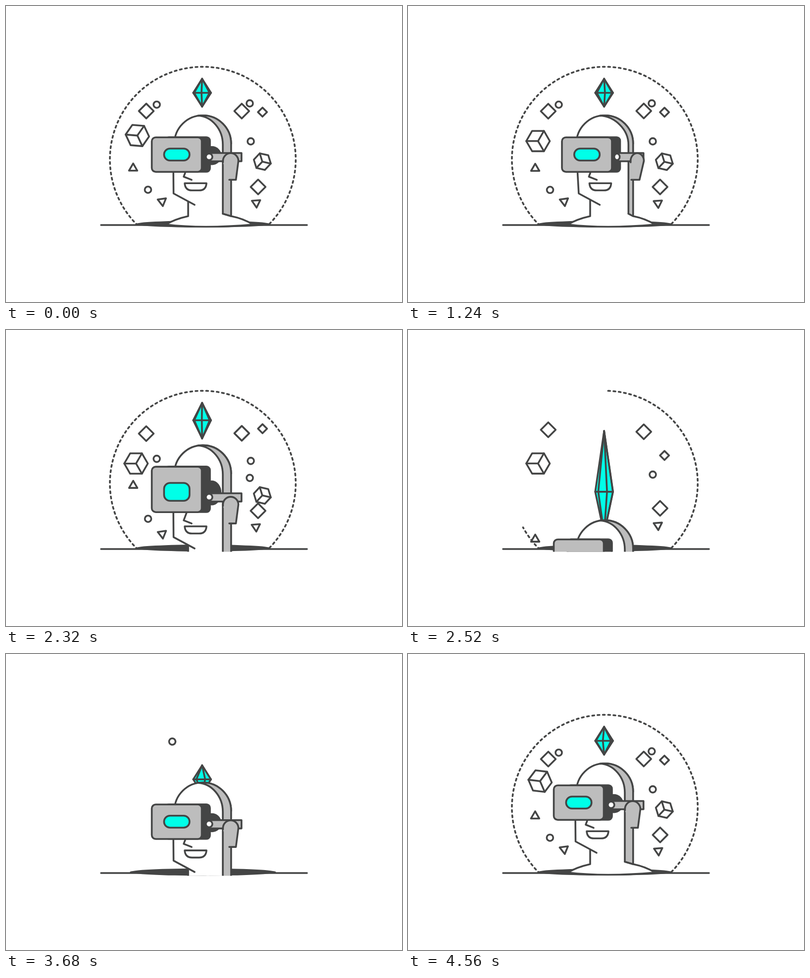
Recreate the animation shown at these times as an HTML page with a canvas. Size 800 px wide and 600 px high, loop 4600 ms.

```html
<!DOCTYPE html>
<html lang="en">
<head>
<meta charset="utf-8">
<title>Virtual reality</title>
<style>
html, body { margin: 0; width: 100%; height: 100%; overflow: hidden; background: #fff; }
canvas { display: block; }
</style>
</head>
<body>
<canvas id="stage" width="800" height="600"></canvas>
<script>
const LOOP = 4600, STEP = 40;
const DARK = '#444545', GREY = '#bdbdbd', CYAN = '#00ffe8', WHITE = '#fff';
const ctx = document.getElementById('stage').getContext('2d');
const TAU = Math.PI * 2, RAD = Math.PI / 180;

// ---- easing
const part = (t, start, len) => Math.min(1, Math.max(0, (t - start) / len));
const smooth = p => p * p * (3 - 2 * p);
const inOut = p => p < .5 ? 4 * p ** 3 : 1 - 4 * (1 - p) ** 3;
const backIn = p => 2.7 * p ** 3 - 1.7 * p * p;
const backOut = (p, c) => 1 + (c + 1) * (p - 1) ** 3 + c * (p - 1) ** 2;

function track(keys, t) {
  let i = keys.findIndex(k => k[0] > t);
  if (i === 0) return keys[0][1];
  if (i < 0) return keys[keys.length - 1][1];
  const [t0, a] = keys[i - 1], [t1, b] = keys[i];
  return a + (b - a) * smooth((t - t0) / (t1 - t0));
}

// ---- drawing helpers
function paint(fill, line = DARK) {
  if (fill) { ctx.fillStyle = fill; ctx.fill(); }
  if (line) { ctx.strokeStyle = line; ctx.stroke(); }
}
function poly(points, fill, closed = true, line = DARK) {
  ctx.beginPath();
  points.forEach(([x, y]) => ctx.lineTo(x, y));
  if (closed) ctx.closePath();
  paint(fill, line);
}
function box(x0, y0, x1, y1, r, fill) {
  ctx.beginPath();
  ctx.roundRect(x0, y0, x1 - x0, y1 - y0, r);
  paint(fill);
}
function oval(x, y, rx, ry, fill, line = DARK) {
  ctx.beginPath();
  ctx.ellipse(x, y, rx, ry, 0, 0, TAU);
  paint(fill, line);
}
const ring = (n, r, turn) => Array.from({ length: n }, (_, i) => {
  const a = turn * RAD + i * TAU / n;
  return [r * Math.cos(a), r * Math.sin(a)];
});

// ---- floating shapes: kind, x, y, radius, turn, rise, fall, bob
const SHAPES = [
  ['circle', 304.5, 200, 6.5, 0, 3568, 2012, 0],
  ['circle', 492.5, 197.5, 6.5, 0, 3871, 1988, .4],
  ['circle', 494.5, 274.5, 6.5, 0, 3788, 2240, .4],
  ['circle', 287, 372.7, 6.5, 0, 3818, 2038, -.5],
  ['square', 283.3, 213, 15, 0, 3832, 2285, -1],
  ['square', 476.3, 213, 15, 0, 3761, 2280, 1.4],
  ['square', 509.2, 367, 15, 0, 3792, 2295, .8],
  ['square', 518.2, 215.2, 9.2, 0, 3816, 2226, -.6],
  ['tri', 257, 329.5, 9.7, 30, 3921, 2152, .4],
  ['tri', 315.6, 396, 9.8, 82, 3778, 2012, .4],
  ['tri', 505, 399.6, 9.8, 86, 3922, 2290, -.4],
  ['cube', 262.7, 274, 23.8, 0, 4286, 2276, .8],
  ['cube', 517.8, 315.6, 17.6, 13, 3790, 2032, -.4]
];

function floater([kind, x, y, r, turn, rise, fall, bob], t) {
  const u = t < 2900 ? t + LOOP : t;
  const depth = 472 - y;
  const drop = t < 2900 ? depth * backIn(part(t, fall, 400)) : 0;
  if (u < rise || drop >= depth) return;
  // every shape swings out from above the head to its own place
  let swing = Math.atan2(y - 300, x - 400) / RAD + 90;
  if (swing > 180) swing -= 360;
  const left = -swing * Math.exp((rise - u) / 112);
  ctx.save();
  ctx.translate(400, 300);
  ctx.rotate(left * RAD);
  ctx.translate(x - 400, y - 300 + drop + bob * Math.sin(t / 2300 * TAU));
  const size = part(u, rise, 35);
  ctx.scale(size, size);
  if (kind === 'circle') oval(0, 0, r, r);
  if (kind === 'square') poly(ring(4, r, turn));
  if (kind === 'tri') poly(ring(3, r, turn));
  if (kind === 'cube') {
    const v = ring(6, r, turn);
    poly(v);
    const arms = turn ? [0, 2, 4] : [1, 3, 5];
    arms.forEach(i => poly([[0, 0], v[i]], null, false));
  }
  ctx.restore();
}

function gem(t) {
  const rise = t >= 2900 ? 320 * (1 - backOut(smooth(part(t, 3540, 380)), .6)) : 0;
  const sink = s => t < 2900 ? 320 * part(t, s, 400) ** 3 : rise;
  const top = 147.5 + sink(2295), mid = 176 + sink(2208), low = 204 + sink(2173);
  const cx = 396.2, w = 18;
  poly([[cx, top], [cx + w, mid], [cx, low], [cx - w, mid]], CYAN);
  const spin = (t * 480 / LOOP - 4 + 60) % 60;
  for (let a = spin - 120; a < 90; a += 60) {
    if (a < -90) continue;
    poly([[cx, top], [cx + w * Math.sin(a * RAD), mid], [cx, low]], null, false);
  }
  poly([[cx - w, mid], [cx + w, mid]], null, false);
}

function dome(t) {
  const R = 187.7, len = TAU * R;
  const from = t < 2900 ? inOut(part(t, 2320, 460)) : 0;
  const to = t < 2900 ? 1 : inOut(part(t, 3880, 460));
  const dash = 4, gap = len / 110;
  ctx.save();
  ctx.beginPath();
  ctx.rect(0, 0, 800, 443);
  ctx.clip();
  ctx.beginPath();
  for (let d = 0; d < len - 1; d += gap) {
    const a = Math.max(d, from * len), b = Math.min(d + dash, to * len);
    if (b <= a) continue;
    const s = -Math.PI / 2 - a / R, e = -Math.PI / 2 - b / R;
    ctx.moveTo(397.6 + R * Math.cos(s), 310.9 + R * Math.sin(s));
    ctx.arc(397.6, 310.9, R, s, e, true);
  }
  paint();
  ctx.restore();
}

function hole(t) {
  const rx = track([[2600, 135.5], [2800, 149], [3000, 27], [3440, 27],
    [3660, 148], [3960, 133.5], [4080, 135.5]], t);
  oval(397.8, 442, rx, 3 + rx * .03, DARK, null);
}

function head(t) {
  const k = smooth(part(t, 20, 560)) - smooth(part(t, 1140, 560));
  const wob = t > 2900 ? Math.sin(Math.PI * part(t, 3760, 400)) : 0;
  const base = 260 * (1 - backOut(smooth(part(t, 3510, 440)), 1));
  // each part sinks a little later than the one below it
  const sink = (start, weight) =>
    t < 2900 ? 260 * part(t, start, 400) ** 3 : base - 20 * weight * wob;
  const low = sink(2106, 0), mouth = sink(2108, .2), arm = sink(2119, .5);
  const pillLow = sink(2119, .75), pillTop = sink(2147, 1);
  const discTop = sink(2147, .52), bottom = sink(2119, .5);
  const top = sink(2181, .95), crown = sink(2177, .13);
  const turn = k + .45 * wob;

  // neck and shoulders
  ctx.beginPath();
  ctx.moveTo(368, 395 - 4 * k + low);
  ctx.lineTo(368, 426 + low);
  ctx.quadraticCurveTo(341, 432, 323, 443 + low);
  ctx.quadraticCurveTo(398, 452 + low, 499, 443 + low);
  ctx.quadraticCurveTo(480, 431 + low, 455, 426 + low);
  ctx.lineTo(438 + 8 * k, 421 + low);
  paint(WHITE);

  // face
  const dy = 279 + crown, cx = 397.5, r = 57.3;
  const jaw = [[338 + 4 * k, 322 + bottom], [338.5 + 7 * k, 380 + low], [381 + 7 * k, 403 + low]];
  ctx.beginPath();
  jaw.forEach(p => ctx.lineTo(...p));
  ctx.lineTo(438 + 8 * k, 421 + low);
  ctx.lineTo(455, dy);
  ctx.arc(cx, dy, r, 0, Math.PI, true);
  paint(WHITE, null);
  poly(jaw, null, false);
  ctx.beginPath();
  ctx.arc(cx, dy, r, Math.PI, TAU);
  paint();

  // strap
  const sx = 438 + 8 * turn;
  ctx.beginPath();
  ctx.moveTo(388, 222.3 + crown);
  ctx.bezierCurveTo(416 + 2 * k, 224 + crown, sx, 250 + crown, sx, 281 + crown);
  ctx.lineTo(438 + 8 * k, 421 + low);
  ctx.lineTo(454.8, 426 + low);
  ctx.lineTo(454.8, dy);
  ctx.arc(cx, dy, r, 0, -1.73, true);
  ctx.closePath();
  paint(GREY);

  // nose and mouth
  const f = 7 * k;
  poly([[365 + f, 330 + low], [359 + f, 346 + low], [375 + f, 352.3 + low]], null, false);
  const mx = 361 + 6 * k, my = 359.3 + mouth;
  ctx.beginPath();
  ctx.moveTo(mx, my);
  ctx.lineTo(mx + 44, my);
  ctx.quadraticCurveTo(mx + 43, my + 14.5, mx + 29, my + 14.5);
  ctx.lineTo(mx + 15, my + 14.5);
  ctx.quadraticCurveTo(mx + 1, my + 14.5, mx, my);
  ctx.closePath();
  paint(WHITE);

  // headset
  const d0 = 284 + discTop, d1 = 322.5 + bottom, hx = 18 * k;
  oval(416 - 10 * k, (d0 + d1) / 2, 19.3, (d1 - d0) / 2, DARK, null);
  box(322 + hx, 266 + top, 412 + hx, 336 + bottom, 7, DARK);
  box(294.5 + hx, 266.2 + top, 395.5 + hx, 336.2 + bottom, 8, GREY);
  box(319.3 + hx, 289 + pillTop, 370.8 + hx, 313.2 + pillLow, 12, CYAN);

  // arm, ear piece and hinge
  box(412 + 14 * k, 298 + arm, 475.8, 314.8 + arm, 0, GREY);
  const el = 438.3 + 12.5 * turn, er = 469.5 + 7.7 * turn, er2 = (er - el) / 2;
  ctx.beginPath();
  ctx.moveTo(el, 317 + low);
  ctx.lineTo(el, 314 + low);
  ctx.ellipse((el + er) / 2, 314 + low, er2, 15.7, 0, Math.PI, TAU);
  ctx.lineTo(464.5 + 3.5 * turn, 352.3 + low);
  ctx.lineTo(451, 352.3 + low);
  paint(GREY);
  oval(410.3 + 13 * k, 305.8 + arm, 6.6 - 1.2 * k, 6.6, WHITE);
}

function draw(t) {
  ctx.fillStyle = WHITE;
  ctx.fillRect(0, 0, 800, 600);
  ctx.lineWidth = 3.6;
  ctx.lineCap = ctx.lineJoin = 'round';
  dome(t);
  poly([[192, 444], [608, 444]], null, false);
  hole(t);
  ctx.save();
  ctx.beginPath();
  ctx.rect(0, 0, 800, 449.5);
  ctx.clip();
  SHAPES.forEach(s => floater(s, t));
  if (t < 2900 || t > 3480) {
    gem(t);
    head(t);
  }
  ctx.restore();
}

const begin = performance.now();
function tick() {
  const t = (performance.now() - begin) % LOOP;
  draw(Math.floor(t / STEP) * STEP);
  requestAnimationFrame(tick);
}
tick();
</script>
</body>
</html>
```
